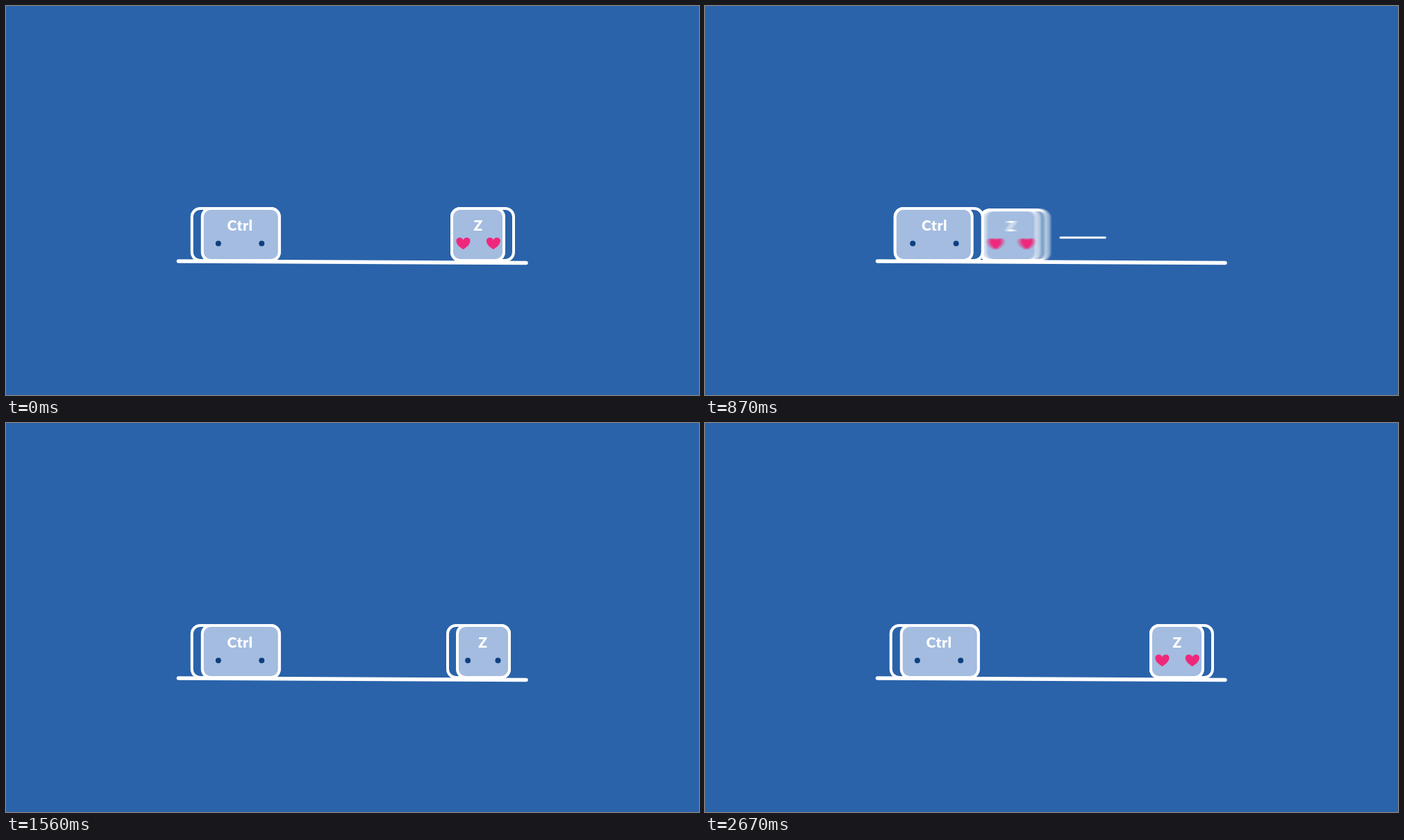
Animation of 998x561 px, one loop 2700 ms. Source, as an HTML page with a canvas:

```html
<!DOCTYPE html>
<html lang="en">
<head>
<meta charset="utf-8">
<title>Ctrl and Z</title>
<style>
  html, body { margin: 0; width: 100%; height: 100%; overflow: hidden; background: #2a63aa; }
  canvas { display: block; }
</style>
</head>
<body>
<canvas id="stage" width="998" height="561"></canvas>
<script>
const LOOP = 2700, STEP = 30, FLOOR = 369;
const BG = '#2a63aa', FACE = '#a3bce0', EYE = '#0e407f', PINK = '#f0287b';
const BURST = 930, BURST_END = 1080;

const stage = document.getElementById('stage');
const ctx = stage.getContext('2d');
const layer = document.createElement('canvas');
layer.width = stage.width;
layer.height = stage.height;
const pen = layer.getContext('2d');

// Timing helpers: progress, eased step, single swell, damped squash and stretch.
const part = (t, a, b) => Math.min(1, Math.max(0, (t - a) / (b - a)));
const ramp = (t, a, b) => { const u = part(t, a, b); return u * u * (3 - 2 * u); };
const bump = (t, a, b) => Math.sin(Math.PI * part(t, a, b));
const wobble = (t, at, len, amp) => {
  const u = part(t, at, at + len);
  return amp * Math.sin(2 * Math.PI * u) * (1 - u / 2);
};
const hop = (t, a, b, h) => { const u = part(t, a, b); return 4 * h * u * (1 - u); };
const white = alpha => `rgba(255,255,255,${alpha})`;

function box(g, cx, w, h) {
  g.beginPath();
  g.roundRect(cx - w / 2 + 2, -h + 2, w - 4, h - 4, 12);
  g.fill();
}

function heart(g, x, y, size) {
  g.save();
  g.translate(x, y);
  g.scale(size, size);
  g.beginPath();
  g.moveTo(0, 8.5);
  g.bezierCurveTo(-13, 1, -12, -8.5, -5, -8.5);
  g.bezierCurveTo(-2.5, -8.5, -0.8, -7, 0, -5);
  g.bezierCurveTo(0.8, -7, 2.5, -8.5, 5, -8.5);
  g.bezierCurveTo(12, -8.5, 13, 1, 0, 8.5);
  g.fillStyle = PINK;
  g.fill();
  g.restore();
}

// turn: -1 looks left, 1 looks right. haze: how milky the side of the key is.
function drawKey({ label, w, pad, gap, x, turn, lift = 0, squash = 0, love = 0, ink = 1, haze = 0, alpha = 1, blur = 0 }) {
  const g = pen;
  g.setTransform(1, 0, 0, 1, 0, 0);
  g.clearRect(0, 0, layer.width, layer.height);
  g.translate(x, FLOOR - lift);
  g.scale(1 + squash, 1 / (1 + squash));

  g.lineWidth = 4;
  g.strokeStyle = white(0.4 + 0.6 * ink);
  g.fillStyle = BG;
  box(g, -3 * turn, w, 79);
  g.fillStyle = white(0.4 * haze);
  g.fill();
  g.stroke();
  g.fillStyle = FACE;
  box(g, (pad / 2 - 3) * turn, w - pad, 79);
  g.stroke();

  const mid = 3.3 * turn;
  g.font = '900 21px Lato, "Open Sans", sans-serif';
  g.letterSpacing = '0.5px';
  g.textAlign = 'center';
  g.fillStyle = white(ink);
  g.fillText(label, mid, -45);
  for (const side of [-1, 1]) {
    const ex = mid + side * gap;
    if (love > 0) {
      heart(g, ex, -26.5, love);
    } else {
      g.beginPath();
      g.arc(ex, -26.5, 4, 0, 7);
      g.fillStyle = EYE;
      g.fill();
    }
  }

  const copies = blur > 0 ? 9 : 1;
  for (let i = 0; i < copies; i++) {
    ctx.globalAlpha = alpha / (i + 1);
    ctx.drawImage(layer, copies > 1 ? blur * (i / (copies - 1) - 0.5) : 0, 0);
  }
  ctx.globalAlpha = 1;
}

const CTRL = { label: 'Ctrl', w: 130, pad: 15, gap: 31.2 };
const Z = { label: 'Z', w: 93, pad: 14, gap: 21.7 };

const leap = t => 41 * ramp(t, 900, 1020);
const fade = t => 1 - 0.85 * ramp(t, 930, 990) * (1 - ramp(t, 1030, 1200));

function ctrlKey(t) {
  drawKey({
    ...CTRL,
    x: 333.7 - 2 * bump(t, 900, 1200),
    lift: leap(t) * (1 - part(t, 1020, 1340) ** 2),
    turn: 1 - 2 * ramp(t, 400, 520) + 2 * ramp(t, 1195, 1365),
    squash: wobble(t, 360, 180, 0.16) - 0.065 * bump(t, 900, 1350) + wobble(t, 1350, 180, 0.08),
    ink: fade(t),
    haze: 1 - fade(t),
    alpha: 1 - 0.24 * ramp(t, 960, 1020) * (1 - ramp(t, 1050, 1500))
  });
}

// Two dashes, each after a small step back.
function visitingZ(t) {
  drawKey({
    ...Z,
    x: 683.5 + 17.5 * ramp(t, 0, 120) - 216 * ramp(t, 150, 382)
      + 12 * ramp(t, 690, 780) - 68 * ramp(t, 780, 910),
    lift: leap(t),
    turn: -1,
    squash: 0.07 * bump(t, 200, 400) - 0.05 * bump(t, 30, 200)
      - 0.05 * bump(t, 690, 820) + 0.03 * bump(t, 810, 930),
    love: 1 - 0.15 * ramp(t, 930, 1020),
    blur: 8 * bump(t, 810, 930),
    ink: fade(t),
    haze: ramp(t, 800, 870),
    alpha: 1 - 0.38 * ramp(t, 960, 1020) - 0.62 * ramp(t, 1020, 1080)
  });
}

function returnedZ(t) {
  drawKey({
    ...Z,
    x: 683.5 - bump(t, 930, 1200),
    lift: hop(t, 960, 1350, 24) + hop(t, 2370, 2520, 20),
    turn: 1 - 2 * ramp(t, 1880, 2047),
    squash: 0.13 * (ramp(t, 930, 1380) - 1) + wobble(t, 1350, 180, 0.08)
      + wobble(t, 1680, 300, 0.25) + wobble(t, 2250, 270, 0.25) + wobble(t, 2520, 120, 0.07),
    love: ramp(t, 2360, 2450) + 0.15 * bump(t, 2400, 2520),
    haze: 1 - ramp(t, 1020, 1290),
    alpha: 0.76 * ramp(t, 960, 1020) + 0.24 * ramp(t, 1020, 1290)
  });
}

function ground(t) {
  const kick = 29 * ramp(t, 900, 960) / (1 + Math.max(0, t - 960) / 60);
  const half = 250.3 + kick * (1 - ramp(t, 1350, 1560));
  ctx.beginPath();
  ctx.moveTo(498.7 - half, 368);
  ctx.lineTo(498.7 + half, 370.5);
  ctx.lineWidth = 5.5;
  ctx.strokeStyle = '#fff';
  ctx.stroke();
}

function streak(t, a, b, x0, x1, len, solid) {
  if (t <= a || t >= b) return;
  const x = x0 + (x1 - x0) * part(t, a, b), end = x + len * bump(t, a, b);
  const grad = ctx.createLinearGradient(x, 0, end, 0);
  grad.addColorStop(solid, '#fff');
  grad.addColorStop(1, white(0));
  ctx.beginPath();
  ctx.moveTo(x, 334);
  ctx.lineTo(end, 334);
  ctx.lineWidth = 3;
  ctx.strokeStyle = grad;
  ctx.stroke();
}

function ring(u) {
  const mid = -0.3 * Math.PI, half = Math.PI * (1 - u ** 1.5);
  ctx.beginPath();
  ctx.arc(375.5, 317.5, 172.5 * (1 - (1 - u) ** 3), mid - half, mid + half);
  ctx.lineWidth = 30 * (1 - u) ** 2;
  ctx.strokeStyle = white(1 - u * u);
  ctx.stroke();
}

// White plate that opens into a frame around both keys.
function flash(t, u) {
  const size = 0.85 + 0.25 * u, inset = 90 * (1 - u) ** 1.75;
  const w = 112 * size, h = 58.5 * size, x = 376.5, y = 329.5 - leap(t);
  ctx.beginPath();
  ctx.roundRect(x - w, y - h, 2 * w, 2 * h, 27);
  if (inset < h) {
    ctx.roundRect(x - w + inset, y - h + inset, 2 * (w - inset), 2 * (h - inset), Math.max(11, 27 - inset));
  }
  ctx.fillStyle = white(ramp(t, 900, 960));
  ctx.fill('evenodd');
}

// Thrown dots: place, travel over one unit of time, radius.
const sparks = [
  { x: 321, y: 181, dx: -14, dy: 2.5, r: 5, color: '#fff' },
  { x: 293.5, y: 225, dx: -20, dy: 14, r: 4.4, color: PINK },
  { x: 462, y: 240, dx: 31, dy: 17, r: 4.4, color: '#c9d8ec' }
];

function drawSparks(t) {
  const s = (t - 1020) / 270, gravity = 57;
  if (t < 960 || s >= 2) return;
  for (const { x, y, dx, dy, r, color } of sparks) {
    ctx.beginPath();
    ctx.arc(x + dx * s, y + (dy - gravity) * s + gravity * s * s, r * (1 - s / 2), 0, 7);
    ctx.fillStyle = color;
    ctx.fill();
  }
}

function draw(t) {
  ctx.fillStyle = BG;
  ctx.fillRect(0, 0, stage.width, stage.height);
  ctx.lineCap = 'round';
  drawSparks(t);
  if (t < BURST_END) visitingZ(t);
  ctrlKey(t);
  if (t > 960) returnedZ(t);
  ground(t);
  streak(t, 210, 390, 676, 560, 61, 0.7);
  streak(t, 800, 930, 555, 475, 67, 0.97);
  if (t > BURST && t < BURST_END) {
    const u = part(t, BURST, BURST_END);
    ring(u);
    flash(t, u);
  }
}

function tick() {
  const t = performance.now() % LOOP;
  draw(Math.floor(t / STEP) * STEP);
  requestAnimationFrame(tick);
}
tick();
</script>
</body>
</html>
```
